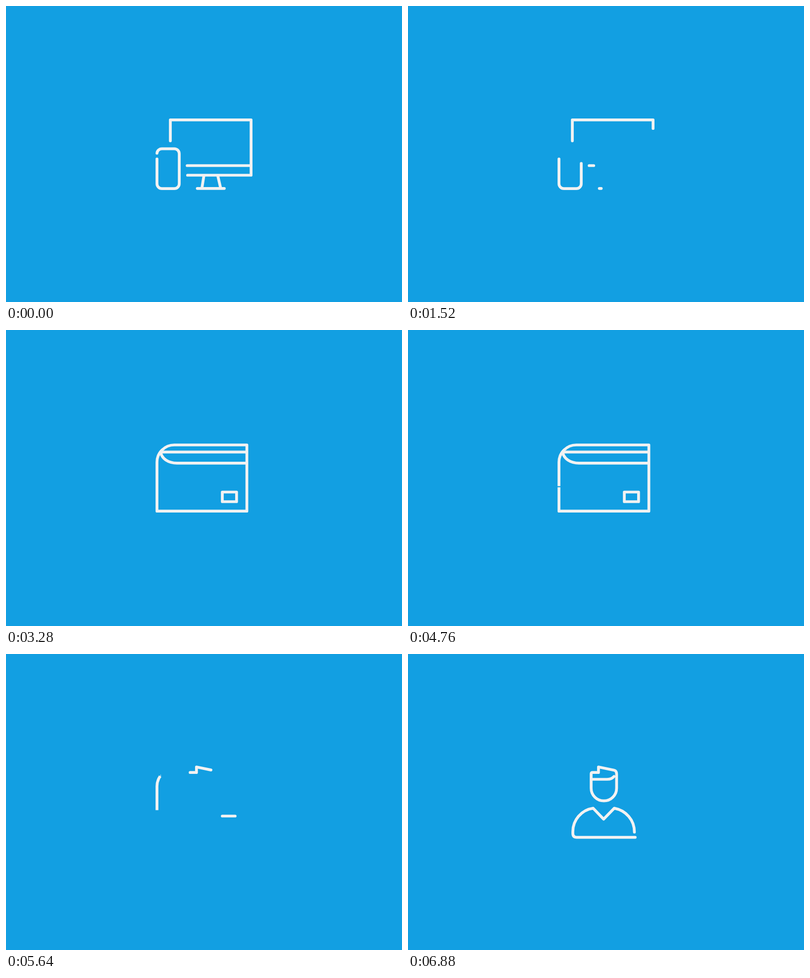
These frames come from a looping animation (800 px wide and 600 px high, 8 s). An HTML page:

```html
<!DOCTYPE html>
<html lang="en">
<head>
<meta charset="utf-8">
<title>Line icons</title>
<style>
html, body { margin: 0; width: 100%; height: 100%; overflow: hidden; background: #129fe2; }
svg { display: block; width: 800px; height: 600px; }
path { fill: none; stroke: #f2f2f2; stroke-width: 5.7; stroke-linejoin: round; stroke-linecap: round; }
.butt { stroke-linecap: butt; }
</style>
</head>
<body>
<svg id="stage" viewBox="0 0 800 600">
  <!-- devices: data-undo pulls the stroke back to its start -->
  <path data-undo="880 2160" d="M332 273.3V230.8H495.1V343H366.8"/>
  <path data-undo="1080 2205" d="M305 310V360A10 10 0 0 0 315 370.2H340A10 10 0 0 0 350 360V299A10 10 0 0 0 340 289.3H315A10 10 0 0 0 305 298.5"/>
  <path data-undo="720 1676" d="M366 323.5H495"/>
  <path data-undo="720 1676" d="M386.5 369.8H441"/>
  <path class="butt" data-undo="720 1480" d="M395.8 369L399.8 344"/>
  <path class="butt" data-undo="720 1480" d="M433.6 369L427.8 344"/>

  <!-- wallet: data-wipe erases from the start towards the end -->
  <path class="butt" data-draw="1608 3280" data-wipe="4720 5885" d="M305 316.5V367.2H486.6V233H340A35 35 0 0 0 305 268V316.5"/>
  <path class="butt" data-draw="2003 3280" data-wipe="4720 5680" d="M486 247.4H312"/>
  <path data-draw="1608 3280" data-wipe="4720 5620" d="M485 269.8H346C328 270 315 261 312.5 248"/>
  <path data-draw="2400 3280" data-wipe="4900 6021" d="M437 328.5V348H465.8V328.5H437"/>

  <!-- person -->
  <path data-draw="5320 6340" d="M372 240.2H384.8V229L416 235.5Q421.4 236.7 421.4 243V272A25.7 25.7 0 0 1 370 272V243.2Q370 240.2 373 240.2"/>
  <path data-draw="6000 6880" d="M371 254H402C410 254 413 251.5 416.3 248.2"/>
  <path data-draw="5777 6880" d="M457.4 361C457.4 336 440 317 416.8 312.6L395.2 334.7L374 312.6C350 316 333 337 333 360V363.5Q333 371.6 341 371.6H459"/>
</svg>
<script>
const LOOP = 8000, STEP = 40;
const smooth = u => u * u * (3 - 2 * u);

// Cubic ease through (.4, 0) and (.45, 1), solved by bisection.
function ease(u) {
  let lo = 0, hi = 1;
  for (let i = 0; i < 24; i++) {
    const s = (lo + hi) / 2, r = 1 - s;
    if (1.2 * r * r * s + 1.35 * r * s * s + s * s * s < u) lo = s;
    else hi = s;
  }
  return smooth(lo);
}

function progress(span, t, curve) {
  const [from, to] = span.split(" ").map(Number);
  const u = (t - from) / (to - from);
  return u <= 0 ? 0 : u >= 1 ? 1 : curve(u);
}

const paths = [...document.querySelectorAll("path")].map(el => ({
  el, len: el.getTotalLength(), ...el.dataset
}));

function render(t) {
  for (const { el, len, draw, wipe, undo } of paths) {
    const a = wipe ? progress(wipe, t, smooth) : 0;
    const b = undo ? 1 - progress(undo, t, smooth) : progress(draw, t, ease);
    el.style.display = b > a ? "" : "none";
    const whole = a === 0 && b === 1;
    el.style.strokeDasharray = whole ? "none" : `${(b - a) * len} ${len * 2}`;
    el.style.strokeDashoffset = whole ? 0 : -a * len;
  }
}

const start = performance.now();
function frame() {
  const t = (performance.now() - start) % LOOP;
  render(Math.floor(t / STEP) * STEP);
  requestAnimationFrame(frame);
}
frame();
</script>
</body>
</html>
```
